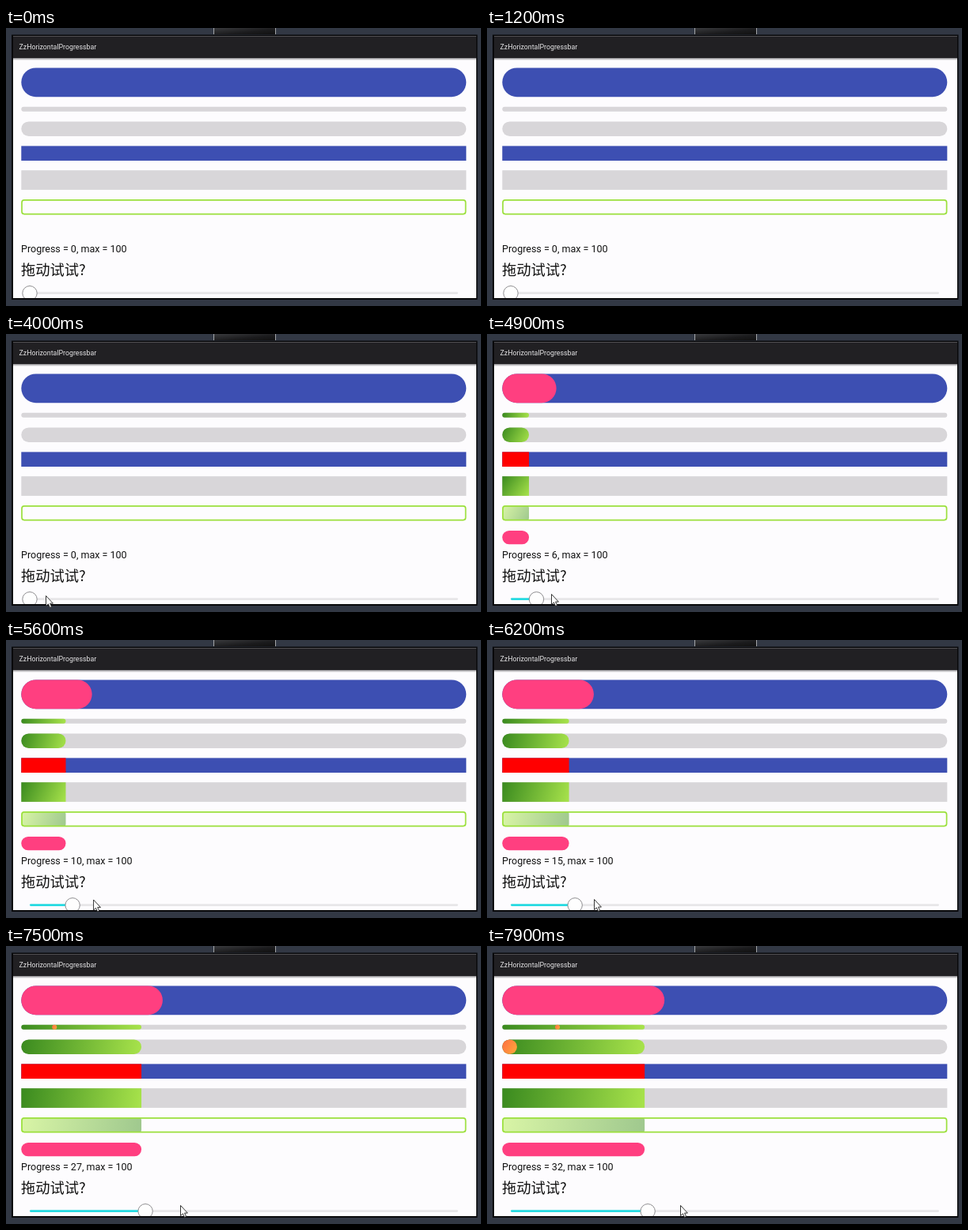
These frames come from a looping animation (600x352 px, 8000 ms). An HTML page:

```html
<!DOCTYPE html>
<html lang="zh">
<head>
<meta charset="utf-8">
<title>Progress bars</title>
<style>
  html, body { margin: 0; width: 100%; height: 100%; overflow: hidden; background: #323844; }
  svg { display: block; width: 600px; height: 352px; }
  text { font-family: Roboto, Inter, sans-serif; }
  .zh { font-family: "Noto Sans CJK SC", "Noto Sans CJK", sans-serif; }
</style>
</head>
<body>
<svg id="stage" viewBox="0 0 600 352">
  <defs>
    <linearGradient id="gloss" x2="1" y2="1">
      <stop offset="0" stop-color="#3a3b3e"/>
      <stop offset=".6" stop-color="#1b1b1d"/>
      <stop offset="1" stop-color="#111"/>
    </linearGradient>
    <linearGradient id="shade" x2="0" y2="1">
      <stop offset="0" stop-color="#8d8c8f"/>
      <stop offset="1" stop-color="#fdfcfe"/>
    </linearGradient>
    <linearGradient id="orange" x2="1" y2=".6">
      <stop offset="0" stop-color="#ff6c42"/>
      <stop offset="1" stop-color="#ffa23c"/>
    </linearGradient>
    <clipPath id="screen"><rect x="9" y="10" width="585" height="332"/></clipPath>
  </defs>

  <rect width="600" height="352" fill="#323844"/>
  <rect x="262" width="79" height="8" fill="url(#gloss)"/>
  <path d="M262.5 0V8M340.5 0V8" stroke="#a3a5a8"/>
  <rect x="7" y="8.5" width="588.5" height="335.5" fill="#08080a"/>
  <rect x="9" y="10.5" width="585" height="331.5" fill="#fdfcfe"/>
  <rect x="9" y="10.5" width="585" height="27.5" fill="#212023"/>
  <rect x="9" y="38" width="585" height="3" fill="url(#shade)"/>
  <text x="16.5" y="26.5" font-size="8.8" fill="#e4e3e5">ZzHorizontalProgressbar</text>

  <g id="bars"></g>

  <text id="label" x="19" y="284" font-size="12.5" fill="#111"></text>
  <text class="zh" x="19" y="313" font-size="18.3" fill="#111">拖动试试?</text>

  <g clip-path="url(#screen)">
    <rect x="30" y="334.3" width="541" height="2.6" rx="1.3" fill="#e7e6e8"/>
    <rect id="track" x="30" y="334.2" height="2.8" rx="1.4" fill="#26dbe2"/>
    <circle id="thumb" cy="335.8" r="9.2" fill="#fefefe" stroke="#8e8d90"/>
  </g>
  <path id="cursor" d="M.5 .5V13.5L3.4 10.9L5.5 15.4L7.6 14.4L5.6 10.1H9.4Z" fill="#fff" stroke="#222" stroke-width=".9"/>
</svg>
<script>
const LOOP = 8000, STEP = 100, LEFT = 19.3, FULL = 562;
const $ = id => document.getElementById(id);

function add(parent, tag, attrs) {
  const el = document.createElementNS("http://www.w3.org/2000/svg", tag);
  set(el, attrs);
  parent.appendChild(el);
  return el;
}
function set(el, attrs) {
  for (const k in attrs) el.setAttribute(k, attrs[k]);
}
const show = (el, on) => el.setAttribute("visibility", on ? "visible" : "hidden");

const GREEN = ["#3a8a1f", "#a8e34b"], PALE = ["#d9f5a6", "#9fc88e"];
const BARS = [
  { y: 50.4, h: 36.8, r: 18.4, back: "#3d4fb2", fill: "#ff3f80", cap: true },
  { y: 99.8, h: 6, r: 3, back: "#d8d6d9", fill: GREEN, lag: 20, from: 21 },
  { y: 118.4, h: 18.6, r: 9.3, back: "#d8d6d9", fill: GREEN, lag: 32, from: 31 },
  { y: 149.4, h: 18.6, r: 0, back: "#3d4fb2", fill: "#ff0000" },
  { y: 180.2, h: 24.7, r: 0, back: "#d8d6d9", fill: GREEN },
  { y: 217.5, h: 18.5, r: 3, fill: PALE, border: true },
  { y: 249, h: 17.2, r: 8.6, fill: "#ff3f80" }
];

BARS.forEach((b, i) => {
  const g = $("bars"), box = { x: LEFT, y: b.y, height: b.h, rx: b.r };
  if (b.back) add(g, "rect", { ...box, width: FULL, fill: b.back });
  let paint = b.fill;
  if (Array.isArray(paint)) {
    b.grad = add(g, "linearGradient", {
      id: "g" + i, gradientUnits: "userSpaceOnUse", x1: LEFT, y1: b.y, y2: b.y + b.h
    });
    b.fill.forEach((c, k) => add(b.grad, "stop", { offset: k, "stop-color": c }));
    paint = `url(#g${i})`;
  }
  b.el = add(g, "rect", { ...box, fill: paint });
  if (b.border) add(g, "rect", {
    x: LEFT + .7, y: b.y + .4, width: FULL - 1.4, height: b.h - .8, rx: 3,
    fill: "none", stroke: "#9be03c", "stroke-width": 1.7
  });
  if (b.lag) b.dot = add(g, "circle", { cy: b.y + b.h / 2, r: b.h / 2, fill: "url(#orange)" });
});

// Each row: time, then values blended linearly between rows
const POINTER = [[2400, 49, 347], [2900, 30, 331], [3500, 30, 331], [4000, 50, 331],
  [4900, 81, 329], [6200, 135, 328], [7000, 190, 328], [7900, 244, 328]];
const PROGRESS = [[4050, 0], [4900, 6], [6200, 15], [7000, 21], [7900, 32]];

function at(rows, t, col) {
  if (t <= rows[0][0]) return rows[0][col];
  for (let i = 1; i < rows.length; i++) {
    const a = rows[i - 1], b = rows[i];
    if (t <= b[0]) return a[col] + (b[col] - a[col]) * (t - a[0]) / (b[0] - a[0]);
  }
  return rows[rows.length - 1][col];
}

function draw(t) {
  const p = Math.floor(at(PROGRESS, t, 1) + .001), part = p / 100;
  for (const b of BARS) {
    const w = b.cap ? b.h + part * (FULL - b.h) : part * FULL;
    b.el.setAttribute("width", w);
    show(b.el, p > 0);
    if (b.grad) b.grad.setAttribute("x2", LEFT + w);
    if (b.dot) {
      const second = Math.max(0, p - b.lag) / 100;
      b.dot.setAttribute("cx", LEFT + b.h / 2 + second * (FULL - b.h));
      show(b.dot, p >= b.from);
    }
  }
  $("label").textContent = `Progress = ${p}, max = 100`;
  $("track").setAttribute("width", part * 541);
  $("thumb").setAttribute("cx", 30 + part * 541);
  show($("cursor"), t >= 2300);
  $("cursor").setAttribute("transform", `translate(${at(POINTER, t, 1)} ${at(POINTER, t, 2)})`);
}

const start = performance.now();
function tick() {
  const t = (performance.now() - start) % LOOP;
  draw(Math.floor(t / STEP) * STEP);
  requestAnimationFrame(tick);
}
tick();
</script>
</body>
</html>
```
